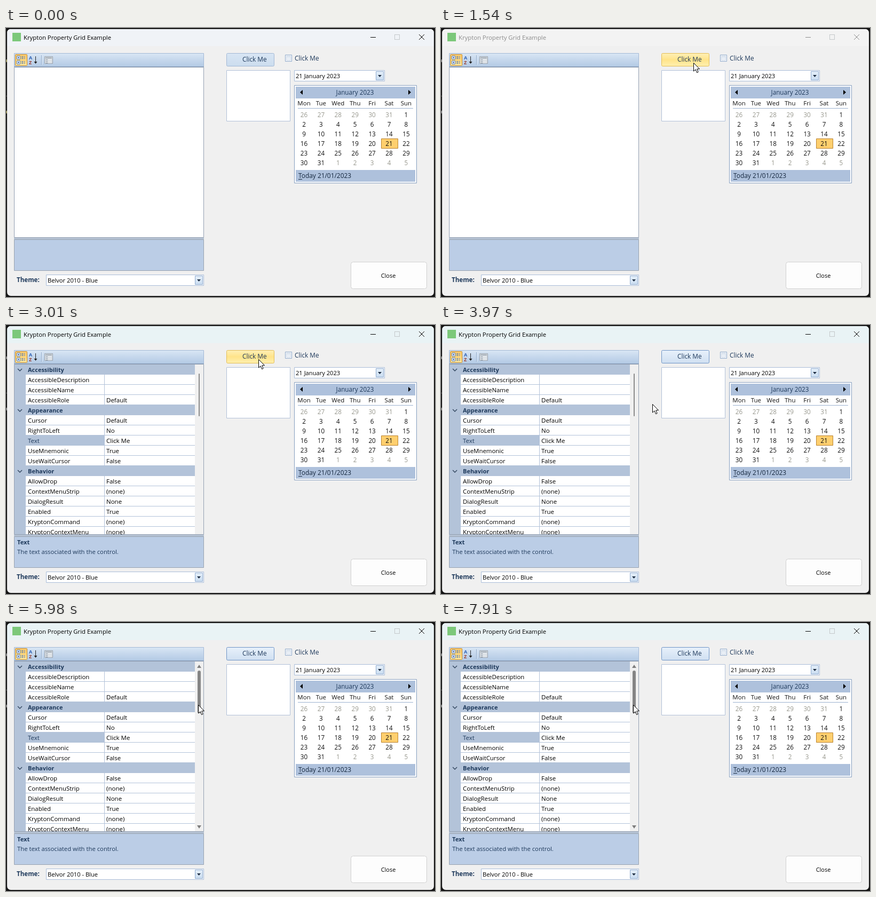
Animation of 804x504 px, one loop 8 s. Source, as an HTML page with a canvas:

```html
<!DOCTYPE html>
<html lang="en">
<head>
<meta charset="utf-8">
<title>Krypton Property Grid Example</title>
<style>
  html, body { margin: 0; width: 100%; height: 100%; overflow: hidden; background: #0c0c0c; }
  canvas { display: block; width: 804px; height: 504px; }
</style>
</head>
<body>
<canvas id="stage" width="804" height="504"></canvas>
<script>
const ctx = document.getElementById('stage').getContext('2d');
const LOOP = 8000, STEP = 70;
const NAVY = '#1e395b', BAND = '#b3c3d9', HEAD = '#aec1dc', EDGE = '#a9bcd8';

// Pointer moves: start, steps, first point, bend, last point
const moves = [
  [420, 12, 546, 478, 419, 272, 441, 157],
  [1260, 5, 445, 140, 462, 100, 473, 65],
  [3010, 1, 473, 64, 473, 64, 473, 64],
  [3150, 6, 466, 68, 420, 108, 398, 147],
  [3970, 7, 396, 148, 360, 178, 328, 192],
  [4660, 5, 335, 190, 358, 180, 378, 173],
  [5210, 12, 378, 172, 406, 172, 360, 155]
];

const rows = [
  ['Accessibility'], ['AccessibleDescription', ''], ['AccessibleName', ''], ['AccessibleRole', 'Default'],
  ['Appearance'], ['Cursor', 'Default'], ['RightToLeft', 'No'], ['Text', 'Click Me'],
  ['UseMnemonic', 'True'], ['UseWaitCursor', 'False'],
  ['Behavior'], ['AllowDrop', 'False'], ['ContextMenuStrip', '(none)'], ['DialogResult', 'None'],
  ['Enabled', 'True'], ['KryptonCommand', '(none)'], ['KryptonContextMenu', '(none)']
];

const clamp = v => Math.max(0, Math.min(1, v));
const steps = (t, start) => Math.floor((t - start) / STEP);
const grey = v => `rgb(${v},${v},${v})`;

function rect(x, y, w, h, fill) {
  ctx.fillStyle = fill;
  ctx.fillRect(x, y, w, h);
}

function box(x, y, w, h, fill, edge, r = 0) {
  ctx.beginPath();
  ctx.roundRect(x + .5, y + .5, w - 1, h - 1, r);
  ctx.fillStyle = fill;
  ctx.fill();
  ctx.lineWidth = 1;
  ctx.strokeStyle = edge;
  ctx.stroke();
}

function shade(y0, y1, ...colors) {
  const g = ctx.createLinearGradient(0, y0, 0, y1);
  colors.forEach((c, i) => g.addColorStop(i / (colors.length - 1), c));
  return g;
}

function path(points, color, fill, width = 1) {
  ctx.beginPath();
  for (let i = 0; i < points.length; i += 2) ctx.lineTo(points[i], points[i + 1]);
  if (fill) {
    ctx.fillStyle = color;
    ctx.fill();
  } else {
    ctx.strokeStyle = color;
    ctx.lineWidth = width;
    ctx.stroke();
  }
}

function text(s, x, y, size = 11.35, color = '#000', weight = 400, align = 'left') {
  ctx.font = `${weight} ${size}px "Open Sans", "Noto Sans", sans-serif`;
  ctx.fillStyle = color;
  ctx.textAlign = align;
  ctx.fillText(s, x, y);
}

function pointerAt(t) {
  let m = null;
  for (const move of moves) if (t >= move[0]) m = move;
  if (!m) return null;
  const [start, n, ax, ay, bx, by, cx, cy] = m;
  const f = n > 1 ? clamp(steps(t, start) / (n - 1)) : 1, g = 1 - f;
  return {
    x: Math.round(g * g * ax + 2 * g * f * bx + f * f * cx),
    y: Math.round(g * g * ay + 2 * g * f * by + f * f * cy)
  };
}

function drawPointer({ x, y }) {
  ctx.save();
  ctx.translate(x + .5, y + .5);
  ctx.beginPath();
  [[0, 0], [0, 15.5], [3.6, 12.3], [6.1, 18.2], [8.6, 17.1], [6.2, 11.4], [11, 11.2]]
    .forEach(p => ctx.lineTo(...p));
  ctx.closePath();
  ctx.fillStyle = '#fff';
  ctx.fill();
  ctx.strokeStyle = '#000';
  ctx.lineWidth = 1;
  ctx.stroke();
  ctx.restore();
}

function drawWindow(t) {
  const active = t < 2400 ? 1 - clamp((steps(t, 70) + 1) / 3) : clamp((steps(t, 2400) + 1) / 3);
  rect(0, 0, 804, 504, '#141414');
  rect(0, 59, 2, 5, t < 70 ? '#8b8550' : '#777');
  rect(0, 127, 2, 1, '#555');
  rect(0, 155, 2, 5, t < 70 ? '#8b8550' : '#777');

  ctx.save();
  ctx.beginPath();
  ctx.roundRect(2, 2, 800, 500, 7);
  ctx.clip();
  rect(0, 0, 804, 504, '#f0f0f0');
  rect(0, 0, 804, 34, '#f3f3f3');
  ctx.globalAlpha = active;
  rect(0, 0, 804, 34, t < 2400 ? '#f0f3f7' : '#e9f3f5');
  ctx.restore();

  const ink = grey(Math.round(140 * (1 - active)));
  rect(12, 9, 16, 16, '#7cc87a');
  text('Krypton Property Grid Example', 33, 22, 11.3, ink);
  rect(683, 17, 10, 1, ink);
  ctx.strokeStyle = '#c4c8ca';
  ctx.lineWidth = 1;
  ctx.strokeRect(728.5, 12.5, 9, 9);
  path([774, 12, 784, 22], ink);
  path([784, 12, 774, 22], ink);
}

function drawToolbar() {
  box(15, 47, 356, 26, shade(47, 73, '#dae7f5', '#c5d7ec', '#b2c9e4'), '#a3b9d6');
  rect(15, 72, 356, 1, '#8ba0bd');
  box(17, 49, 23, 22, shade(49, 71, '#fbc868', '#ffd678', '#ffe8a0'), '#c2892f', 1);

  for (const y of [52, 61]) {
    box(20, y, 7, 7, '#fff', '#4a73b0');
    rect(22, y + 3, 3, 1, '#24509a');
    rect(23, y + 2, 1, 3, '#24509a');
    for (let i = 0; i < 3; i++) {
      rect(29, y + 1 + i * 2, 3, 1, '#4773b8');
      rect(33, y + 1 + i * 2, 3, 1, '#8396ad');
    }
  }

  text('A', 43, 59, 9, '#2f62b5', 700);
  text('Z', 43, 68, 9, '#9b4437', 700);
  rect(55, 53, 1, 12, '#222');
  path([52.5, 63, 58.5, 63, 55.5, 67], '#222', true);
  rect(66, 51, 1, 18, '#8fa8c8');
  rect(67, 51, 1, 18, '#e4eef9');
  box(72, 53, 16, 14, '#d5dbe1', '#9aa3ad');
  rect(74, 55, 12, 2, '#a6afb8');
  for (let y = 59; y < 66; y += 3) {
    rect(75, y, 3, 1, '#8f99a4');
    rect(79, y, 6, 1, '#f2f4f6');
  }
}

function drawScroll(t, p) {
  rect(354, 74, 16, 318, '#f0f0f0');
  if (t < 4730) {
    box(361, 91, 2, 80, '#8b8b8b', '#8b8b8b');
    return;
  }
  const hover = t > 5210 && p.x < 370;
  const color = hover ? '#858585' : '#8b8b8b';
  ctx.beginPath();
  ctx.roundRect(359, 91, 6, 80, 3);
  ctx.fillStyle = color;
  ctx.fill();
  const arrow = hover ? '#7d7d7d' : '#cbcbcb';
  path([358, 86, 362, 80, 366, 86], arrow, true);
  path([358, 381, 362, 387, 366, 381], arrow, true);
}

function drawGrid(t, p) {
  const full = t >= 2680;
  box(15, 73, 356, 320, '#fff', '#93a0b2');
  rect(15, 393, 356, 3, '#b5c2d3');
  box(15, 396, 356, 59, '#bbcde6', '#98a3b0');
  if (!full) return;

  ctx.save();
  ctx.beginPath();
  ctx.rect(16, 74, 354, 318);
  ctx.clip();
  rect(16, 74, 21, 318, BAND);
  rows.forEach(([name, value], i) => {
    const y = 74 + 19 * i;
    if (value === undefined) {
      rect(16, y, 338, 19, BAND);
      text(name, 41, y + 14, 11, NAVY, 700);
      path([22, y + 8, 26, y + 12, 30, y + 8], '#32465f', false, 1.4);
      return;
    }
    rect(37, y + 18, 317, 1, BAND);
    rect(184, y, 1, 19, BAND);
    const picked = name === 'Text';
    if (picked) rect(37, y, 147, 19, BAND);
    text(name, 41, y + 14, 11.4, picked ? NAVY : '#000');
    text(value, 188, y + 14, 11.5);
  });
  drawScroll(t, p);
  ctx.restore();

  text('Text', 21, 411, 11.2, NAVY, 700);
  text('The text associated with the control.', 21, 429, 11.3, NAVY);
}

function drawCombo(x, y, w, label) {
  box(x, y, w, 21, '#fff', EDGE);
  text(label, x + 3, y + 15, 11.15);
  const bx = x + w - 17;
  box(bx, y + 2, 15, 17, shade(y + 2, y + 19, '#e6f0fa', '#c9dcf0'), '#90acd0');
  path([bx + 4, y + 9, bx + 11, y + 9, bx + 7.5, y + 13], '#1d2c40', true);
}

function drawButton(t, p) {
  const over = p && p.x >= 413 && p.x < 503 && p.y >= 47 && p.y < 73;
  const pressed = t >= 2400 && t < 2680;
  let fill = shade(47, 72, '#d9e6f4', '#cbdcee'), edge = '#a2b8d5';
  if (over && pressed) {
    fill = shade(47, 72, '#f7d376', '#ffe189', '#ffe58d');
    edge = '#b58b35';
  } else if (over) {
    fill = shade(47, 72, '#fff0b8', '#ffe48a', '#fff0b0');
    edge = '#e3bd55';
  } else if (t >= 2680) {
    fill = shade(47, 72, '#e8f1fb', '#cfdff1');
    edge = '#6e94c6';
  }
  box(413, 47, 90, 25, fill, edge, 2);
  text('Click Me', 443, 63, 11.8, NAVY);
}

function drawCalendar() {
  box(540, 107, 230, 184, '#fff', '#859ebf');
  rect(543, 110, 224, 22, HEAD);
  rect(543, 266, 224, 22, HEAD);
  path([556, 116, 551, 120.5, 556, 125], '#000', true);
  path([754, 116, 759, 120.5, 754, 125], '#000', true);
  text('January 2023', 654, 125, 11.7, NAVY, 400, 'center');

  const column = i => 558.5 + 31.9 * i;
  ['Mon', 'Tue', 'Wed', 'Thu', 'Fri', 'Sat', 'Sun']
    .forEach((d, i) => text(d, column(i), 145, 11.5, '#111', 400, 'center'));
  rect(547, 150, 216, 1, '#9db2d0');

  box(703, 207, 32, 19, '#ffcf6e', '#b9822f');
  for (let i = 0; i < 42; i++) {
    const n = i - 5, inside = n > 0 && n < 32;
    const day = n < 1 ? n + 31 : inside ? n : n - 31;
    text(day, column(i % 7), 167 + 18 * Math.floor(i / 7), 11.7, inside ? '#111' : '#98988e', 400, 'center');
  }
  text('Today 21/01/2023', 548, 281, 11.9, '#16283f');
  rect(548, 283, 7, 1, '#16283f');
}

function drawControls(t, p) {
  drawButton(t, p);
  box(523, 50, 13, 13, '#fff', '#8fa9ca');
  box(525, 52, 9, 9, shade(52, 61, '#dbe4ef', '#f3f6fa'), '#cbd7e6');
  text('Click Me', 541, 61, 11.8, NAVY);
  box(413, 79, 120, 96, '#fff', '#b1c0d8');
  drawCombo(540, 79, 170, '21 January 2023');
  drawCalendar();
  text('Theme:', 20, 476, 11.6, NAVY, 700);
  drawCombo(75, 462, 296, 'Belvor 2010 - Blue');
  box(646, 438, 143, 51, '#fdfdfd', '#d0d0d0', 4);
  text('Close', 716.5, 468, 10.9, '#000', 400, 'center');
}

// Click highlight flashes three times around the pointer tip
function drawClicks(t, { x, y }) {
  if (t < 7380 || t >= 7910 || Math.floor((t - 7380) / 106) % 2) return;
  ctx.beginPath();
  ctx.arc(x, y, 12, 0, Math.PI * 2);
  ctx.fillStyle = 'rgba(255,255,0,.47)';
  ctx.fill();
}

function draw(t) {
  const p = pointerAt(t);
  drawWindow(t);
  drawToolbar();
  drawGrid(t, p);
  drawControls(t, p);
  if (p) {
    drawClicks(t, p);
    drawPointer(p);
  }
}

function tick() {
  draw(performance.now() % LOOP);
  requestAnimationFrame(tick);
}
tick();
</script>
</body>
</html>
```
